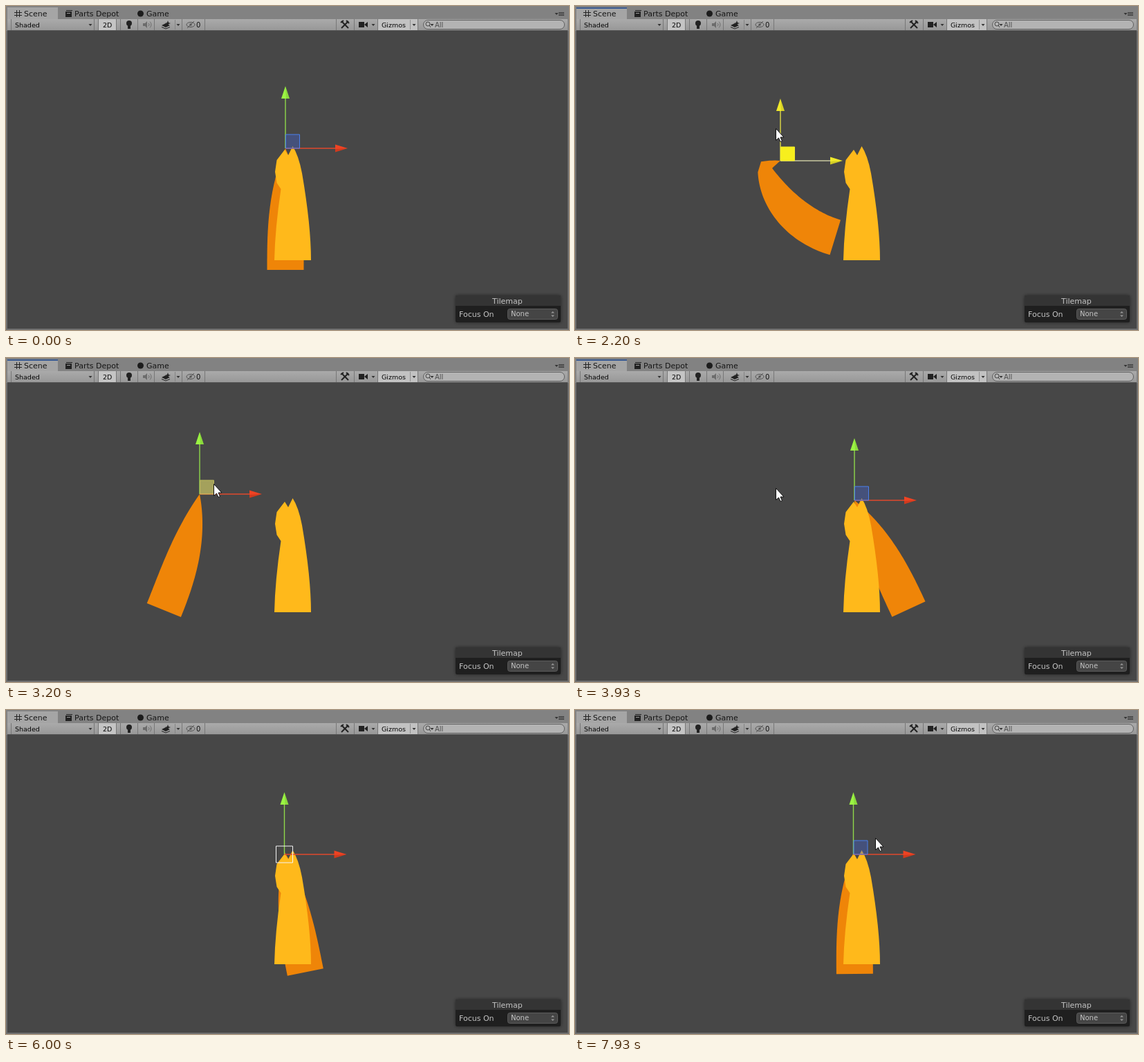
Animation, 814 px wide and 469 px high, one loop 8000 ms. Source, as an HTML page with a canvas:

```html
<!DOCTYPE html>
<html lang="en">
<head>
<meta charset="utf-8">
<title>Scene view</title>
<style>
  html, body { margin: 0; width: 100%; height: 100%; overflow: hidden; background: #828282; }
  canvas { display: block; }
</style>
</head>
<body>
<canvas id="stage" width="814" height="469"></canvas>
<script>
const ctx = document.getElementById('stage').getContext('2d');
const LOOP = 8000;
const UNDO = 3670, REFOCUS = 5000, RETURN = 7400;

// Eased interpolation through rows of [time, ...values].
function track(keys, t) {
  if (t <= keys[0][0]) return keys[0].slice(1);
  const i = keys.findIndex(k => k[0] > t);
  if (i < 0) return keys[keys.length - 1].slice(1);
  const a = keys[i - 1], b = keys[i];
  const p = (1 - Math.cos(Math.PI * (t - a[0]) / (b[0] - a[0]))) / 2;
  return a.slice(1).map((v, j) => v + (b[j + 1] - v) * p);
}

const dragPath = [
  [1800, 404, 206], [1960, 414, 250], [2090, 258, 238], [2165, 300, 228], [2200, 297, 224],
  [2400, 148, 188], [2660, 296, 197], [2950, 280, 197]
];
// Rows of [time, mean angle, curl, bend at the tip], in degrees.
const dragPose = [
  [1800, 0, 0, 0], [1960, 2, 4, 0], [2100, 42, 30, -20], [2200, 40, 33, -80], [2300, 38, 22, -10],
  [2400, 36, 10, 0], [2680, -8, 4, 0], [2980, -23, -8, 0], [3200, -17, -5, 0], [3400, 8, 2, 0]
];
const swingCurl = [[3670, -4], [3930, -1.7], [4730, -3.5], [6000, 1.7], [6750, -1], [7800, 0]];
const cursorIn = [[1000, 515, 304], [1330, 380, 230], [1530, 411, 195]];
const cursorDrag = [
  [1800, 411, 195], [1940, 425, 238], [2060, 262, 222], [2140, 308, 212], [2200, 290, 177],
  [2380, 160, 176], [2640, 308, 184], [2950, 300, 182], [3400, 300, 182], [3670, 290, 188]
];
const cursorBack = [[7400, 166, 290], [7860, 434, 185]];

function gizmoAt(t) {
  if (t < UNDO) return track(dragPath, t);
  return t < REFOCUS ? [404, 206] : [402.5, 209];
}

function poseAt(t) {
  if (t < UNDO) return track(dragPose, t);
  const dt = t - 4250;
  const angle = 54 * Math.exp(-dt / 1050) * Math.cos(2 * Math.PI * dt / 1670);
  return [Math.max(-38, angle), track(swingCurl, t)[0], 0];
}

function cursorAt(t) {
  if (t >= 1000 && t < 1800) return track(cursorIn, t);
  if (t >= 1800 && t < 4200) return track(cursorDrag, t);
  return t >= RETURN ? track(cursorBack, t) : null;
}

function box(x, y, w, h, fill, stroke, r = 0) {
  ctx.beginPath();
  ctx.roundRect(x, y, w, h, r);
  if (fill) { ctx.fillStyle = fill; ctx.fill(); }
  if (stroke) { ctx.strokeStyle = stroke; ctx.lineWidth = 1; ctx.stroke(); }
}

function poly(points, fill, stroke) {
  ctx.beginPath();
  points.forEach(p => ctx.lineTo(...p));
  ctx.closePath();
  ctx.fillStyle = fill;
  ctx.fill();
  if (stroke) { ctx.strokeStyle = stroke; ctx.lineWidth = 1; ctx.stroke(); }
}

function line(x1, y1, x2, y2, color, width = 1) {
  ctx.beginPath();
  ctx.moveTo(x1, y1);
  ctx.lineTo(x2, y2);
  ctx.strokeStyle = color;
  ctx.lineWidth = width;
  ctx.stroke();
}

function disc(x, y, r, fill) {
  ctx.beginPath();
  ctx.arc(x, y, r, 0, 7);
  ctx.fillStyle = fill;
  ctx.fill();
}

function label(text, x, y, color = '#161616', size = 11) {
  ctx.font = `${size}px "DejaVu Sans", sans-serif`;
  ctx.fillStyle = color;
  ctx.fillText(text, x, y);
}

const downArrow = (x, y, color = '#333') => poly([[x - 2.5, y - 1], [x + 2.5, y - 1], [x, y + 2]], color);

function drawTabs(focused) {
  box(0, 0, 814, 469, '#828282');
  box(2, 2, 73, 17, '#a5a5a5');
  if (focused) box(2, 2, 73, 2, '#3b5b92');
  for (const d of [15.5, 19.5]) {
    line(d, 6, d, 16, '#222');
    line(12, d - 6, 23, d - 6, '#222');
  }
  label('Scene', 26, 15);
  box(86, 8, 9, 8, '#222');
  line(87, 6.5, 96, 6.5, '#222');
  line(88, 10.5, 93, 10.5, '#999');
  label('Parts Depot', 99, 15);
  disc(194.5, 11, 4.5, '#1c1c1c');
  label('Game', 203, 15);
  downArrow(796, 11);
  for (const y of [9.5, 11.5, 13.5]) line(799, y, 807, y, '#333');
}

function drawToolbar() {
  const shade = ctx.createLinearGradient(0, 19, 0, 36);
  shade.addColorStop(0, '#aaa');
  shade.addColorStop(1, '#979797');
  box(2, 19, 810, 17, shade);
  box(134, 19, 25, 16, '#c4c4c4');
  box(538, 19, 57, 16, '#c2c2c2');
  for (const x of [7, 127, 133, 159, 165, 190, 214, 254, 287, 477, 503, 537, 595]) {
    line(x + .5, 19, x + .5, 35, '#777');
  }
  line(2, 35.5, 812, 35.5, '#555');
  label('Shaded', 13, 31, '#050505', 9.5);
  downArrow(122, 27);
  label('2D', 140, 31, '#050505', 9.5);

  disc(178, 25, 4, '#222');
  box(176, 28, 4, 5, '#222');

  poly([[198, 25], [201, 25], [204, 22], [204, 32], [201, 29], [198, 29]], '#6c6c6c');
  for (const r of [3, 6]) {
    ctx.beginPath();
    ctx.arc(204, 27, r, -.8, .8);
    ctx.strokeStyle = '#6c6c6c';
    ctx.stroke();
  }

  poly([[225, 28], [231, 25], [237, 28], [231, 31]], '#222');
  line(225, 30.5, 231, 33, '#222');
  line(231, 33, 237, 30.5, '#222');
  poly([[234, 21], [235, 24], [238, 25], [235, 26], [234, 29], [233, 26], [230, 25], [233, 24]], '#222');
  line(244.5, 20, 244.5, 34, '#858585');
  downArrow(249, 27);

  ctx.beginPath();
  ctx.ellipse(267, 27, 6, 3.5, 0, 0, 7);
  ctx.strokeStyle = '#555';
  ctx.stroke();
  disc(267, 27, 1.7, '#555');
  line(262, 32, 272, 22, '#555');
  label('0', 275, 31, '#111', 10);

  line(485, 22, 495, 32, '#222', 2);
  line(485, 32, 495, 22, '#222', 2);
  line(484, 24, 488, 21, '#222', 2);
  line(492, 21, 496, 25, '#222', 2);
  box(510, 23, 8, 8, '#222');
  poly([[518, 27], [523, 23], [523, 31]], '#222');
  downArrow(531, 27);
  label('Gizmos', 543, 31, '#050505', 9.5);
  line(584.5, 20, 584.5, 34, '#909090');
  downArrow(590, 27);

  box(603.5, 20.5, 204, 13, '#b3b3b3', '#5f5f5f', 6.5);
  ctx.beginPath();
  ctx.arc(610, 26, 3, 0, 7);
  ctx.strokeStyle = '#444';
  ctx.stroke();
  line(612, 28, 614, 31, '#444');
  downArrow(616, 27);
  label('All', 620, 31, '#4c4c4c', 10);
}

function drawPanel() {
  ctx.save();
  ctx.shadowColor = 'rgba(0,0,0,.5)';
  ctx.shadowBlur = 5;
  box(650, 419, 152, 39, '#1f1f1f', null, 2);
  ctx.restore();
  box(650, 419, 152, 15, '#343434');
  label('Tilemap', 703, 431, '#c4c4c4');
  label('Focus On', 655, 450, '#c4c4c4');
  box(725.5, 438.5, 72, 15, '#454545', '#5c5c5c', 3);
  label('None', 730, 449, '#c4c4c4', 10);
  poly([[788, 444.5], [793, 444.5], [790.5, 442]], '#999');
  poly([[788, 447.5], [793, 447.5], [790.5, 450]], '#999');
}

// A tapered strip around a spine hanging from (x, y).
function drawTail(x, y, [angle, curl, hook]) {
  const steps = 48, length = 176;
  const left = [[x, y]], right = [];
  for (let i = 1; i <= steps; i++) {
    const s = i / steps;
    const a = (angle + curl * (2 * s - 1) + (s < .15 ? hook : 0)) * Math.PI / 180;
    const half = 26.5 * (1 - (1 - s) ** 2.8);
    x += Math.sin(a) * length / steps;
    y += Math.cos(a) * length / steps;
    left.push([x - Math.cos(a) * half, y + Math.sin(a) * half]);
    right.unshift([x + Math.cos(a) * half, y - Math.sin(a) * half]);
  }
  poly([...left, ...right], '#ef8508');
}

function drawBody() {
  ctx.beginPath();
  ctx.moveTo(388, 368);
  ctx.quadraticCurveTo(389, 322, 397.5, 265);
  for (const p of [[391.5, 256], [389, 240], [391.5, 223], [403, 208], [408, 216], [414.5, 203]]) ctx.lineTo(...p);
  ctx.quadraticCurveTo(423, 216, 428, 242);
  ctx.quadraticCurveTo(441, 318, 441, 368);
  ctx.fillStyle = '#ffb91b';
  ctx.fill();
}

function drawGizmo(x, y, mode) {
  const drag = mode === 'drag';
  const green = drag ? '#f1ea2b' : '#9bf443';
  const red = drag ? '#f1ea2b' : '#ee4323';
  line(x, y, x, y - 73, drag ? '#e2dc45' : '#8fd84a', 1.4);
  line(x, y, x + 73, y, drag ? '#c9c9a0' : '#e0492c', 1.4);
  poly([[x - 6, y - 72], [x + 6, y - 72], [x, y - 90]], green);
  poly([[x + 72, y - 5.5], [x + 72, y + 5.5], [x + 90, y]], red);
  poly([[x + 1, y - 72], [x + 6, y - 72], [x, y - 90]], 'rgba(0,0,0,.1)');
  poly([[x + 72, y + 1], [x + 72, y + 5.5], [x + 90, y]], 'rgba(0,0,0,.12)');
  if (mode === 'snap') {
    box(x - 12, y - 12, 24, 24, null, '#f4f4f4');
    return;
  }
  const [fill, stroke] = {
    idle: ['rgba(66,96,200,.4)', '#4a80ee'],
    hover: ['rgba(240,235,110,.55)', '#bdb95c'],
    drag: ['#f7ef1d', '#f1ea2b']
  }[mode];
  box(x + .5, y - 20, 20, 20, fill, stroke);
}

function drawCursor(x, y) {
  const outline = [[0, 0], [0, 17], [4, 13.5], [6.5, 19], [9, 18], [6.5, 12.5], [11.5, 12.5]];
  poly(outline.map(([dx, dy]) => [x + dx + .5, y + dy + .5]), '#fff', '#111');
}

function gizmoMode(t) {
  if (t >= REFOCUS && t < RETURN) return 'snap';
  if (t >= 1730 && t < 3000) return 'drag';
  return t >= 1470 && t < UNDO ? 'hover' : 'idle';
}

function draw(t) {
  const [gx, gy] = gizmoAt(t);
  const cursor = cursorAt(t);
  drawTabs(t >= 1730 && t < REFOCUS);
  drawToolbar();
  box(0, 36, 814, 433, '#6f6f6f');
  box(2, 36, 810, 431, '#474747');
  ctx.save();
  ctx.beginPath();
  ctx.rect(2, 36, 810, 431);
  ctx.clip();
  drawTail(t >= REFOCUS ? gx + .5 : gx, t >= REFOCUS ? 206 : gy, poseAt(t));
  drawBody();
  drawGizmo(gx, gy, gizmoMode(t));
  drawPanel();
  if (cursor) drawCursor(...cursor);
  ctx.restore();
}

const start = performance.now();
function frame() {
  draw((performance.now() - start) % LOOP);
  requestAnimationFrame(frame);
}
frame();
</script>
</body>
</html>
```
